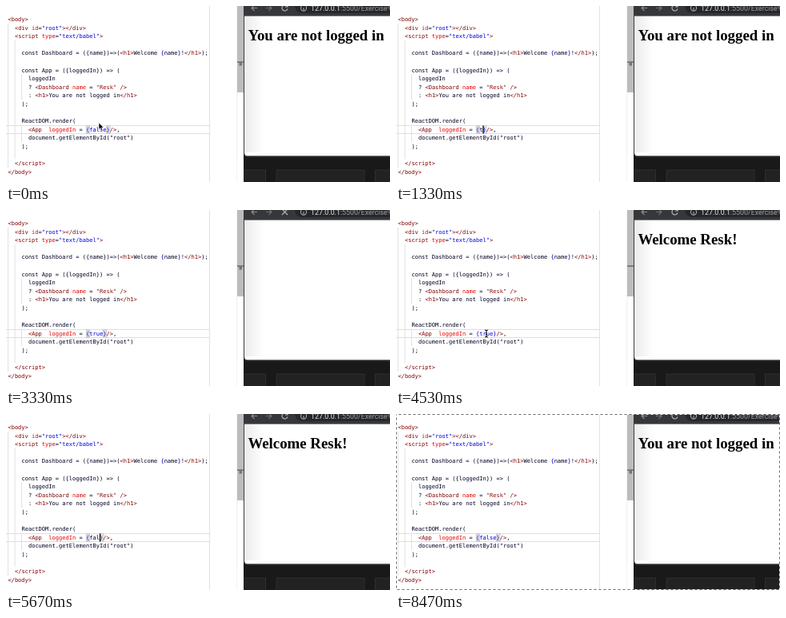
Write an HTML page that moves like this. It is 480 by 220 pixels and loops after 8790 ms.

```html
<!DOCTYPE html>
<html lang="en">
<head>
<meta charset="utf-8">
<title>Conditional rendering demo</title>
<style>
  html, body { margin: 0; width: 100%; height: 100%; overflow: hidden; background: #fff; }
  svg { display: block; width: 480px; height: 220px; }
  .code text { font: 7.06px "DejaVu Sans Mono", monospace; white-space: pre; }
  .k { fill: #000024; }
  .t { fill: #800000; }
  .a { fill: #e50000; }
  .s { fill: #0000d8; }
  .q { fill: #8c1010; }
  #heading { font: bold 18.85px "Liberation Serif", serif; }
  .url { font: 8.9px Roboto, sans-serif; }
</style>
</head>
<body>
<svg viewBox="0 0 480 220">
  <defs>
    <linearGradient id="edge">
      <stop offset="0" stop-color="#ebebeb"/>
      <stop offset="1" stop-color="#fff"/>
    </linearGradient>
  </defs>
  <rect width="480" height="220" fill="#fff"/>

  <g id="guides" stroke="#d9d9d9" stroke-width=".8"></g>
  <g id="lineMark" fill="#dedede">
    <rect y="149" width="254" height="1"/>
    <rect y="159" width="254" height="1"/>
  </g>
  <rect id="selection" x="104.5" y="149.4" height="10.6" fill="#9fcbfb"/>
  <g id="braces" fill="#ececec" stroke="#b4b4b4" stroke-width=".7">
    <rect x="100.3" y="149.8" width="4.2" height="9.4"/>
    <rect id="closeBrace" y="149.8" width="4.2" height="9.4"/>
  </g>
  <g class="code" id="code"></g>
  <rect id="caret" y="149.5" width="1.2" height="10" fill="#000"/>

  <rect x="254" width="1" height="220" fill="#e2e2e2"/>
  <rect x="288.5" width=".8" height="220" fill="#e8e8e8"/>
  <rect x="289" width="8" height="108" fill="#bcbcbc"/>
  <rect x="289" y="69.5" width="8" height="1.2" fill="#555"/>
  <rect id="ruler" x="291.5" y="71" width="3.5" height="3.6" fill="#777"/>

  <rect x="297" width="183" height="220" fill="#191919"/>
  <path d="M298 0H480V187.5H302Q298 187.5 298 183.500Z" fill="#fff"/>
  <rect x="298" y="12" width="24" height="171" fill="url(#edge)"/>
  <path d="M297.5 0V183.5Q297.5 188 302 188H480" fill="none" stroke="#444" stroke-width=".9"/>
  <g fill="#222" stroke="#2e2e2e">
    <rect x="290" y="205" width="34.5" height="30"/>
    <rect x="338" y="205" width="110" height="30"/>
    <rect x="461.5" y="205" width="40" height="30"/>
  </g>
  <rect x="289" y="188" width="8" height="32" fill="#fff"/>

  <rect x="297" width="183" height="12.6" fill="#36373a"/>
  <path d="M480 0H361Q362 9 371 9H480Z" fill="#26272a"/>
  <g fill="none" stroke="#8d8f92" stroke-width="1.1">
    <path d="M314 2.5H307M310.5 -1L307 2.5L310.5 6"/>
    <path d="M325 2.5H332M328.5 -1L332 2.5L328.5 6" stroke="#717376"/>
    <path id="reload" d="M351.6 .5A3.6 3.6 0 1 0 352 3.5M352 -2V1H349" stroke="#b6b8ba"/>
    <path id="stop" d="M345 -1L352 6M352 -1L345 6" stroke="#b6b8ba"/>
    <circle cx="372" cy="2.5" r="3.6" stroke="#a5a7aa"/>
    <path d="M372 2V5" stroke="#a5a7aa"/>
  </g>
  <text class="url" x="381" y="5.7" fill="#e4e5e7">127.0.0.1<tspan fill="#9fa1a5">:5500/Exercise%20</tspan></text>
  <text id="heading" x="302.4" y="43"></text>

  <path id="arrow" d="M0 0V8.4L2 6.6L3.4 9.8L4.9 9.1L3.5 6.1H6.1Z" fill="#000" stroke="#fff" stroke-width=".6"/>
  <path id="beam" d="M-2 -4.5Q0 -4.5 0 -3Q0 -4.5 2 -4.5M0 -3.5V3.5M-2 4.5Q0 4.5 0 3Q0 4.5 2 4.5M-1 1H1" fill="none" stroke="#111" stroke-width="1.1"/>
  <g id="frame" fill="none">
    <rect x=".5" y=".5" width="479" height="219" stroke="#fff"/>
    <rect id="ants" x=".5" y=".5" width="479" height="219" stroke="#666" stroke-dasharray="3 3"/>
  </g>
</svg>
<script>
const LOOP = 8790, CHAR = 4.25, LEFT = 2.4, ROW = 10.6, BASE = 18.9;
const VALUE_X = 104.5;
const $ = id => document.getElementById(id);

// "§" starts a coloured run; the next letter is its class.
const lines = [
  [0, '§t<body>'],
  [2, '§t<div§a id§k=§s"root"§t></div>'],
  [2, '§t<script§a type§k=§s"text/babel"§t>'],
  null,
  [4, '§kconst Dashboard = ({name})=>(§t<h1>§kWelcome §s{§kname§s}§k!§t</h1>§k);'],
  null,
  [4, '§kconst App = ({loggedIn}) => ('],
  [6, '§kloggedIn'],
  [6, '§k? §t<Dashboard§a name§k = §q"Resk"§t />'],
  [6, '§k: §t<h1>§kYou are not logged in§t</h1>'],
  [4, '§k);'],
  null,
  [4, '§kReactDOM.render('],
  [6, ''],
  [6, '§kdocument.getElementById("root")'],
  [4, '§k);'],
  null,
  [2, '§t<\/script>'],
  [0, '§t</body>']
];
const escapeText = s => s.replace(/</g, '&lt;').replace(/>/g, '&gt;');
const colour = s => s.split('§').slice(1)
  .map(run => `<tspan class="${run[0]}">${escapeText(run.slice(1))}</tspan>`).join('');

$('code').innerHTML = lines.map((line, i) => line
  ? `<text id="row${i}" x="${LEFT + line[0] * CHAR}" y="${BASE + i * ROW}">${colour(line[1])}</text>`
  : '').join('');

// Indent guides: column, first row, last row.
$('guides').innerHTML = [[0, 1, 17], [2, 3, 16], [4, 7, 9], [4, 13, 14]]
  .map(([column, first, last]) => {
    const x = LEFT + column * CHAR + .2, top = BASE - 7.8;
    return `<path d="M${x} ${top + first * ROW}V${top + (last + 1) * ROW}"/>`;
  }).join('');

// Latest value whose start time has passed.
const at = (track, t) => track.reduce((value, [start, next]) => t >= start ? next : value, track[0][1]);
const within = (t, ...spans) => spans.some(([from, to]) => t >= from && t < to);
const ease = (t, from, to) => {
  const u = Math.min(1, Math.max(0, (t - from) / (to - from)));
  return u * u * (3 - 2 * u);
};
const show = (id, on) => $(id).setAttribute('visibility', on ? 'visible' : 'hidden');
const place = (id, x, y) => $(id).setAttribute('transform', `translate(${x} ${y})`);

const typed = [
  [0, 'false'], [1270, 't'], [1530, 'tr'], [1670, 'tru'], [1870, 'true'],
  [5200, 'f'], [5530, 'fa'], [5670, 'fal'], [5800, 'fals'], [5870, 'false']
];
const headings = [
  [0, 'You are not logged in'], [3330, ''], [3400, 'Welcome Resk!'],
  [6930, ''], [7070, 'You are not logged in']
];
let shownValue;

function draw(t) {
  const value = at(typed, t);
  const endX = VALUE_X + value.length * CHAR;
  const selected = within(t, [470, 1270], [4670, 5200]);
  const matched = !selected && !within(t, [4400, 4670]);

  if (value !== shownValue) {
    const kind = /^(true|false)$/.test(value) ? 's' : 'k';
    $('row13').innerHTML = colour(`§t<App§a  loggedIn§k = §s{§${kind}${value}§s}§t/>§k,`);
    shownValue = value;
  }
  $('heading').textContent = at(headings, t);

  show('lineMark', !selected);
  show('selection', selected);
  $('selection').setAttribute('width', endX - VALUE_X);
  show('braces', matched);
  $('closeBrace').setAttribute('x', endX);
  show('ruler', matched);
  $('caret').setAttribute('x', endX - .3);
  show('caret', within(t, [1270, 2330], [2870, 3330], [3870, 4400],
    [5200, 6470], [6930, 7470], [7930, 8470]));

  const loading = within(t, [2870, 3400], [6670, 7070]);
  show('stop', loading);
  show('reload', !loading);

  const late = t >= 7800;
  show('arrow', t < 270 || within(t, [7800, 8200]));
  place('arrow', 116, late ? 147 - 43 * ease(t, 7800, 7930) : 146 + 3 * ease(t, 70, 270));
  show('beam', within(t, [270, 1270], [4070, 5200]));
  const beamX = t < 1270 ? (t < 1000 ? 122 : 117) : 117 - 4 * ease(t, 4070, 4530);
  place('beam', beamX, 154.5);

  show('frame', t >= 8200);
  $('ants').setAttribute('stroke-dashoffset', -Math.floor((t - 8200) / 90));
}

const start = performance.now();
function tick() {
  draw((performance.now() - start) % LOOP);
  requestAnimationFrame(tick);
}
draw(0);
requestAnimationFrame(tick);
</script>
</body>
</html>
```
